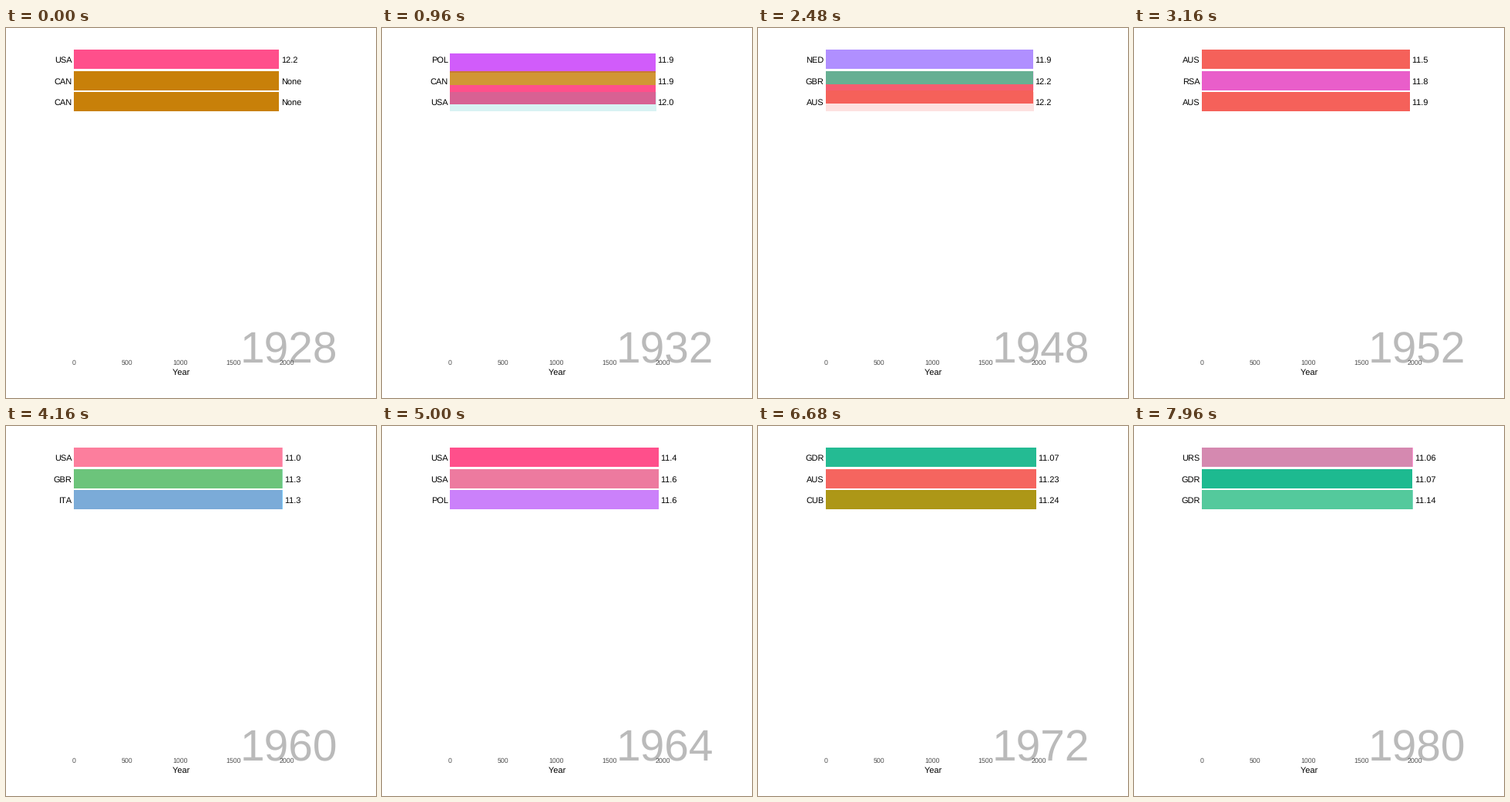
Animation of 480x480 px, one loop 8 s. Source, as a matplotlib script:

```python
import math

import matplotlib.pyplot as plt
from matplotlib.animation import FuncAnimation
from matplotlib.patches import Rectangle

plt.rcParams["font.family"] = "Liberation Sans"
plt.rcParams["text.hinting"] = "no_hinting"
plt.rcParams["text.kerning_factor"] = 6  # even digit spacing

SIZE, DPI = 480, 100
FRAMES, INTERVAL = 200, 40
START, PERIOD, MORPH = 0.4, 18.93, 17  # in frames

X0, PX_PER_YEAR = 88, 0.1382
ROW_Y, ROW_STEP, BAR_H = 40.7, 27.5, 25
GAP = 2.3

COLORS = {
    "AUS": "#f5615a", "CAN": "#c88009", "CUB": "#ab9410", "EUA": "#85a112",
    "FRG": "#20b43f", "GBR": "#1fb968", "GDR": "#1dba90", "GER": "#22b9be",
    "ITA": "#0fa3f9", "NED": "#9f76ff", "POL": "#d15cfa", "RSA": "#f04cd6",
    "URS": "#ff4ab4", "USA": "#ff4f8b",
}

STATES = [
    (1928, "USA CAN CAN", "12.2 None None"),
    (1932, "POL CAN USA", "11.9 11.9 12.0"),
    (1936, "USA POL GER", "11.5 11.7 11.9"),
    (1948, "NED GBR AUS", "11.9 12.2 12.2"),
    (1952, "AUS RSA AUS", "11.5 11.8 11.9"),
    (1956, "AUS EUA AUS", "11.5 11.7 11.7"),
    (1960, "USA GBR ITA", "11.0 11.3 11.3"),
    (1964, "USA USA POL", "11.4 11.6 11.6"),
    (1968, "USA USA POL", "11.0 11.1 11.1"),
    (1972, "GDR AUS CUB", "11.07 11.23 11.24"),
    (1976, "FRG GDR FRG", "11.08 11.13 11.17"),
    (1980, "URS GDR GDR", "11.06 11.07 11.14"),
]
STATES = [(year, codes.split(), marks.split()) for year, codes, marks in STATES]

fig = plt.figure(figsize=(SIZE / DPI, SIZE / DPI), dpi=DPI, facecolor="white")
ax = fig.add_axes([0, 0, 1, 1])
ax.set_xlim(0, SIZE)
ax.set_ylim(SIZE, 0)
ax.axis("off")


def label(x, y, text, px, color="black", ha="center", z=5):
    return ax.text(x, y, text, fontsize=px * 72 / DPI, color=color,
                   ha=ha, va="baseline", zorder=z)


def mix(a, b, t):
    return a + (b - a) * t


def ease(u):
    return (1 - math.cos(math.pi * u)) / 2


def bar_end(year):
    return X0 + year * PX_PER_YEAR


def row_center(row):
    return ROW_Y + row * ROW_STEP


title = label(303.4, 434, "", 56.9, "#bababa", "left", 1)
for tick in range(0, 2001, 500):
    label(bar_end(tick), 437, str(tick), 8.8, "#4d4d4d")
label(227.2, 450, "Year", 11)
baselines = [45, 73, 100]
names = [label(X0 - GAP, y, "", 11, ha="right") for y in baselines]
values = [label(X0, y, "", 11, ha="left") for y in baselines]
bars = [Rectangle((X0, 0), 0, BAR_H, linewidth=0, snap=True, zorder=2 + i / 10)
        for i in range(6)]
for bar in bars:
    ax.add_patch(bar)


def tween_bars(old, new, t):
    """Bars of one country slide; the others fade out or in on the spot."""
    (year_a, codes_a, _), (year_b, codes_b, _) = old, new
    entering = list(range(3))
    result = []
    for row, code in enumerate(codes_a):
        target = next((r for r in entering if codes_b[r] == code), None)
        if target is None:
            result.append((code, row, year_a, 1 - t))
        else:
            entering.remove(target)
            result.append((code, mix(row, target, t), mix(year_a, year_b, t), 1))
    result += [(codes_b[r], r, year_b, t) for r in entering]
    return result


def update(frame):
    step, local = divmod(max(frame - START, 0), PERIOD)
    old, new = STATES[int(step)], STATES[int(step) + 1]
    t = ease(min(local / MORPH, 1))

    shown = tween_bars(old, new, t)
    for i, bar in enumerate(bars):
        bar.set_visible(i < len(shown))
        if i < len(shown):
            code, row, year, alpha = shown[i]
            bar.set_y(row_center(row) - BAR_H / 2)
            bar.set_width(year * PX_PER_YEAR)
            bar.set_facecolor(COLORS[code])
            bar.set_alpha(alpha)

    year, codes, marks = new if t >= 0.5 else old
    title.set_text(str(year))
    x = bar_end(mix(old[0], new[0], t)) + GAP
    for name, value, code, mark in zip(names, values, codes, marks):
        name.set_text(code)
        value.set_text(mark)
        value.set_x(x)
    return [*bars, *names, *values, title]


anim = FuncAnimation(fig, update, frames=FRAMES, interval=INTERVAL,
                     repeat=True, repeat_delay=0)
plt.show()
```
